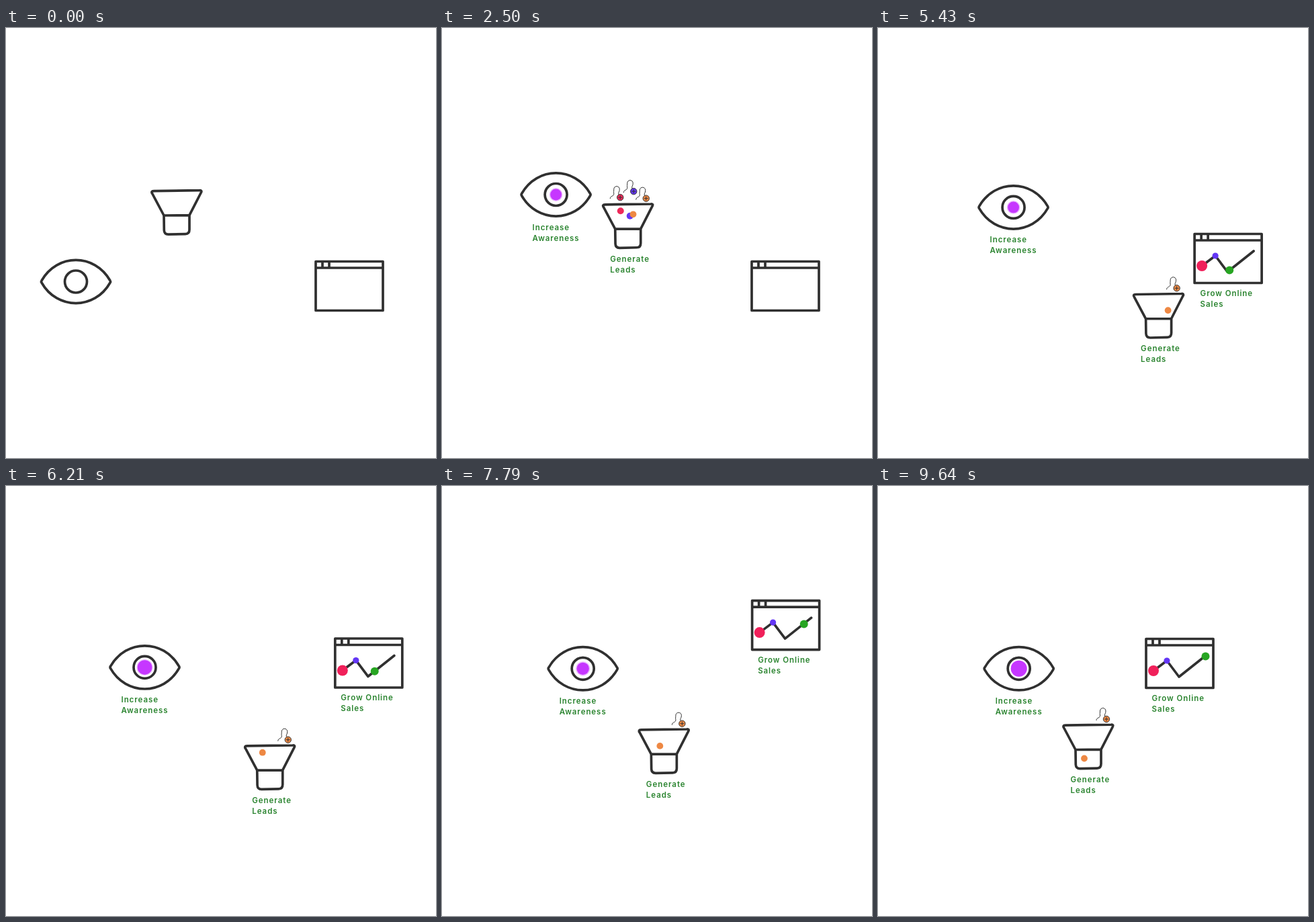
An HTML page that plays this animation: 640 by 640 pixels, repeating every 9.71 s.

```html
<!DOCTYPE html>
<html lang="en">
<head>
<meta charset="utf-8">
<style>
  html, body { margin: 0; height: 100%; overflow: hidden; background: #fff; }
  svg { display: block; width: 100vw; height: 100vh; }
  .ink { fill: none; stroke: #303030; stroke-width: 3.7; stroke-linecap: round; stroke-linejoin: round; }
  text { font: 600 11.5px Inter, sans-serif; letter-spacing: .95px; fill: #2a842f; }
</style>
</head>
<body>
<svg viewBox="0 0 640 640">
  <defs>
    <g id="person" stroke="#333" stroke-width="1">
      <path d="M-15 2C-15-3-9-1-9.500-6C-10-8-9.500-9-9.500-12C-9.500-18-1-18-1-12C-1-8-3-8-2.500-5Q-2-3 0-3" fill="none"/>
      <circle r="4.700"/>
      <path d="M-3 0H3M0-3V3"/>
    </g>
  </defs>

  <g id="eye">
    <g class="ink">
      <path d="M-51-1.500C-28-42.300 28-42.300 51-1.500Q52 0 51 1.500C28 42.300-28 42.300-51 1.500Q-52 0-51-1.500Z"/>
      <circle r="16.500"/>
    </g>
    <g class="extra">
      <circle id="halo" fill="#c637ff" opacity=".35"/>
      <circle id="pupil" fill="#c637ff"/>
      <text x="-35" y="52.500">Increase<tspan x="-35" dy="16">Awareness</tspan></text>
    </g>
  </g>

  <g id="funnel">
    <path class="ink" d="M-34 .7L34-.3Q38.500-.5 36 3.500L19 36.700V58Q19 64.500 13 64.600L-12.500 65.200Q-18.500 65-18.700 59L-19 37L-36 5Q-39 .8-34 .7ZM-19 37L19 36.700"/>
    <g class="extra">
      <g class="early">
        <use href="#person" x="-11.500" y="-10" fill="#ee2a5a"/>
        <use href="#person" x="8.500" y="-19" fill="#6336f5"/>
        <circle id="redBall" r="5" fill="#ee2a5a"/>
        <circle id="blueBall" r="5" fill="#6336f5"/>
      </g>
      <use href="#person" x="27" y="-8.500" fill="#ee8843"/>
      <circle id="orangeBall" r="4.900" fill="#ee8843"/>
      <text x="-26.500" y="85.500">Generate<tspan x="-26.500" dy="16">Leads</tspan></text>
    </g>
  </g>

  <g id="browser">
    <path class="ink" d="M-50-36.500H50V36.500H-50ZM-50-27H50M-40-36.500V-27M-30-36.500V-27"/>
    <g class="extra">
      <path class="ink" d="M-39 11L-19-4L-1 20L38-11"/>
      <circle cx="-39" cy="11" r="8" fill="#f0205a"/>
      <circle cx="-19" cy="-4" r="4.600" fill="#6336f5"/>
      <circle id="greenBall" r="6" fill="#27a522"/>
      <text x="-41.500" y="56">Grow Online<tspan x="-41.500" dy="16">Sales</tspan></text>
    </g>
  </g>
</svg>
<script>
const LOOP = 9710, FPS = 14, END = 9640;
const EYE_ON = 200, FUNNEL_ON = 1800, BROWSER_ON = 4500;
const BALLS_MERGE = 4500, BALL_RESTART = 5800;
const $ = id => document.getElementById(id);

const progress = (t, from, to) => Math.min(1, Math.max(0, (t - from) / (to - from)));
const place = (id, x, y) => $(id).setAttribute('transform', `translate(${x} ${y})`);
const show = (selector, on) =>
  document.querySelector(selector).setAttribute('visibility', on ? 'inherit' : 'hidden');

function draw(t) {
  // Eased displacement; overlapping ones add up to curved routes.
  const go = (from, to, by) => by * (1 - Math.cos(Math.PI * progress(t, from, to))) / 2;

  const drift = Math.sin(Math.PI / 2 * progress(t, 2500, 7500));
  place('eye',
    104 + go(0, 500, -22) + go(400, 1100, 30) + go(1600, 2550, 58) + 39.7 * drift,
    377.5 + go(0, 1600, -157) + go(1950, 2500, 27.5) + 23.8 * drift);
  place('funnel',
    254 + go(1770, 4850, 172) + go(4700, 8850, -113),
    242 + go(1730, 5030, 157) + go(4700, 8850, -43.5));
  place('browser',
    511 + go(4600, 7000, 38) + go(6450, END, -100),
    384 + go(4540, 7550, -205) + go(6600, END, 85));

  const pulse = 10.2 + 1.8 * Math.cos((t - 3930) / 2855 * 2 * Math.PI);
  $('pupil').setAttribute('r', pulse);
  $('halo').setAttribute('r', Math.min(pulse + 1.5, 12));

  place('redBall', -11 + go(2500, 3930, 22), 10 + go(2500, 3930, 8));
  place('blueBall', 3 + go(2500, 3930, -9), 17.5 + go(2500, 3930, 2.5));
  if (t < BALL_RESTART)
    place('orangeBall', -11 + go(FUNNEL_ON, 2850, 25), 13.5 + go(1500, 5430, 11));
  else
    place('orangeBall', -11 + go(6210, 7790, 5), 10.5 + go(6500, END, 39.5));

  const along = go(BROWSER_ON, END, 39.5);
  place('greenBall', along - 1, 20 - .772 * along);

  show('#eye .extra', t >= EYE_ON);
  show('#funnel .extra', t >= FUNNEL_ON);
  show('#funnel .early', t < BALLS_MERGE);
  show('#browser .extra', t >= BROWSER_ON);
}

const start = performance.now();
function tick() {
  const t = (performance.now() - start) % LOOP;
  draw(Math.floor((t + 6) * FPS / 1000) * 1000 / FPS);
  requestAnimationFrame(tick);
}
tick();
</script>
</body>
</html>
```
